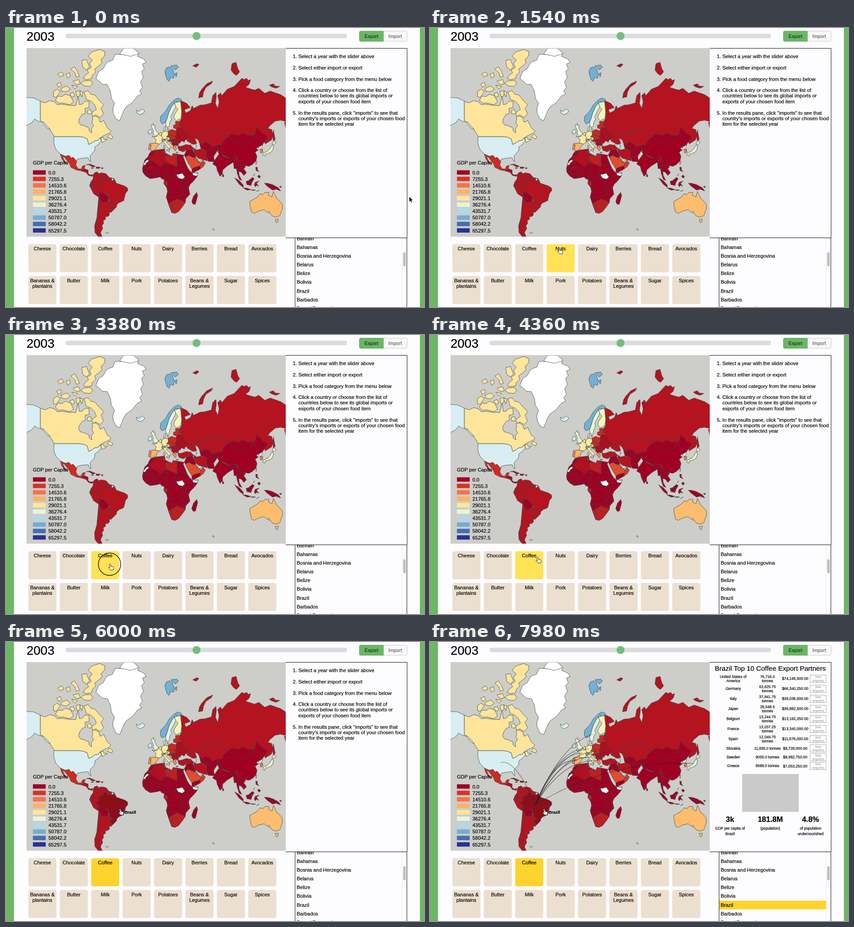
An HTML page for the animation above (8 s loop, 916 px wide and 611 px high).

```html
<!DOCTYPE html>
<html lang="en">
<head>
<meta charset="utf-8">
<title>Food trade map</title>
<style>
html, body { margin: 0; width: 100%; height: 100%; overflow: hidden; background: #fdfcfe; }
svg { display: block; width: 916px; height: 611px; font: 10.95px "Liberation Sans", Arial, sans-serif; }
text:not([fill]) { stroke: #000; stroke-width: .2; }
#map path { stroke: #37474a; stroke-width: .8; stroke-linejoin: round; }
#map .lines { fill: none; }
#arcs path { fill: none; stroke: #222; stroke-opacity: .58; stroke-width: 1.2; }
</style>
</head>
<body>
<svg viewBox="0 0 916 611">
<defs>
  <clipPath id="mapClip"><rect x="45" y="44" width="568" height="413"/></clipPath>
  <clipPath id="listClip"><rect x="633" y="460" width="247" height="151"/></clipPath>
</defs>
<rect width="916" height="611" fill="#fdfcfe"/>
<path d="M0 0H17.5V611H0ZM907 0H916V611H907Z" fill="#6cb664"/>
<rect x="130.500" y="12.500" width="616.500" height="10" rx="4" fill="#dcdcdc"/>
<circle cx="417.500" cy="17.500" r="8.800" fill="#76bd7c"/>
<rect x="774.500" y="7" width="104.500" height="22" rx="2.500" fill="#f8f8f8" stroke="#c9c9c9"/>
<path d="M777 7H827V29H777Q774.500 29 774.500 26V10Q774.500 7 777 7Z" fill="#69b764" stroke="#5aa556"/>

<g clip-path="url(#mapClip)" id="map">
<rect x="45" y="44" width="568" height="413" fill="#cdcdca"/>
<g fill="#fee59a">
  <path d="M75 160 85 164 96 159 107 162 112 168 123 167 136 169 153 170 158 150 161 168 168 166 173 160 182 161 182 174 173 176 174 187 167 189 161 198 159 206 163 212 171 214 182 219 182 225 188 230 187 220 192 214 188 207 190 202 189 193 197 193 204 198 206 206 211 205 214 202 222 219 230 225 227 230 213 236 206 241 213 239 215 244 222 244 211 251 209 247 208 242 206 241 202 246 195 247 188 252 181 255 178 243 169 239 159 238H106L96 222 83 207 75 204Z"/>
  <path d="M187 53 205 47 217 52 216 61 208 70 211 76 202 84 194 90 197 96 189 104 188 111 176 113 169 110 174 103 181 98 178 92 187 86 183 78 189 70 180 62Z"/>
  <path d="M166 71 176 69 180 78 183 85 176 92 168 86Z"/>
  <path d="M170 116 186 115 190 122 184 128 172 127 164 121Z"/>
  <path d="M171 140 180 137 186 145 195 147 204 158 214 168 208 176 214 188 206 196 196 190 192 194 187 186 198 178 194 168 186 160 176 156Z"/>
  <path d="M108 158 114 149 123 150 130 145 142 149 148 162 140 168 124 164 116 165Z"/>
  <path d="M104 150 104 139 112 134 119 139 110 152ZM140 144 147 141 151 149 144 152ZM153 139 163 137 161 149 156 151ZM121 132 133 127 141 134 132 140 121 138ZM111 123 119 119 122 126 115 130Z"/>
  <path d="M142 90 150 85 156 94 161 106 154 108 151 98ZM131 101 139 98 141 106 135 110ZM147 116 159 113 163 122 154 124ZM113 101 122 96 127 103 118 107ZM144 125 157 128 151 134ZM178 181 185 178 189 188 179 188ZM161 139 169 140 166 151Z"/>
  <path d="M222 239 227 232 234 238 232 243Z"/>
</g>
<path fill="#fff" d="M197 111 203 95 213 89 221 75 234 70 239 58 256 58 265 50 279 45 291 55 288 62 302 68 307 75 299 79 303 90 297 95 301 108 295 118 299 130 293 137 297 145 288 149 277 163 263 173 258 181 254 191 249 203 241 199 235 187 234 176 238 165 231 154 229 139 222 124 211 123 205 117Z"/>
<path fill="#fff" d="M249 57 258 44 279 44 292 56 273 62Z"/>
<g fill="#d8eef2">
  <path d="M44 152 60 153 75 160V203L83 207 97 222 91 220 79 206 70 204 63 199 57 207 44 214Z"/>
  <path d="M105 238H159L169 239 178 243 181 255 188 252 195 247 202 246 206 241 209 247 202 255 195 260 194 269 184 280 186 293 183 291 180 284 168 285 157 287 155 292 147 283 143 285 138 279 130 281 119 276 109 265 105 253Z"/>
  <path d="M286 180 291 183 299 177 304 182 301 187 293 190 287 186Z"/>
</g>
<path fill="#cf2a21" d="M119 276 130 281 138 279 143 285 147 283 155 292 153 300 158 308 164 309 168 302 174 301 171 309 165 313 154 311 142 305 139 297 127 282 124 282 128 290 133 297 129 296 122 286Z"/>
<g fill="#ad0f20">
  <path d="M165 313 171 308 180 311 180 319 185 322 191 321 189 325 181 323 175 316Z"/>
  <path d="M176 299 184 298 196 303 190 305 183 300ZM198 304 207 305 203 308 197 307ZM209 306 213 306 212 308 209 308ZM187 306 192 307 188 308Z"/>
</g>
<g fill="#b31420">
  <path d="M191 322 194 317 200 315 203 319 209 317 219 319 226 327 237 330 236 337 226 362 204 371 192 363 183 345 186 337 191 330Z"/>
  <path d="M203 371 211 364 214 380 227 378 233 387 227 394 234 400 230 404 226 403 227 409 223 413 218 413 218 419 213 422 214 428 210 433 212 439 207 448 211 458H203L195 448 194 433 199 416 201 394Z"/>
  <path class="lines" d="M200 315 199 323 211 327 209 335 205 336 204 345M186 337 204 345 198 352M184 342 192 342 196 339M213 361 203 362 204 370M211 366 207 381 204 405 201 425 199 440 204 455M214 380 208 383M227 394 225 402M227 378 222 382 233 387M226 327 226 334M231 329 232 334"/>
</g>
<path fill="#a00022" d="M204 360 213 361 222 367 226 373 223 380 210 382 205 371Z"/>
<path fill="#e5f4cf" d="M232 329 237 331 235 335 231 334Z"/>
<path id="brazil" d="M237 330 240 336 242 340 251 343 260 346 266 350 267 356 262 362 260 370 258 378 247 383 243 387 242 392 234 400 227 394 233 387 230 384 226 378 226 372 222 366 213 361 204 359 198 353 204 346 204 338 209 336 213 336 213 331 220 329 222 335 235 334Z"/>

<g fill="#b31420">
  <path d="M383 159 396 165 404 174 391 179 394 186 404 181 408 170 411 176 425 169 436 168 450 164 453 148 460 141 461 150 459 165 464 176 467 162 464 148 470 142 473 148 485 134 500 128 517 110 522 113 527 110 531 115 536 113 533 123 525 130 545 136 554 132 567 143 579 138 602 146 614 154V205L602 202 590 204 578 214 574 220 582 222 585 233 582 245 568 254 566 248 573 238 562 232 549 217 545 235 531 235 518 230 509 235 496 232 487 237 473 231 463 223 452 222 440 226 441 232 428 231 418 233 414 241 418 253 410 255 396 247 402 237 392 229 386 218 379 215 381 204 385 197 385 184Z"/>
  <path d="M422 153 424 142 429 134 440 122 453 116 450 122 438 130 433 140 431 151ZM495 78 504 75 508 89 512 96 505 104 499 100 493 92ZM409 83 418 78 423 80 417 86ZM577 125 586 122 590 127 600 128 592 132 582 129ZM586 223 588 234 590 244 586 248 584 236ZM610 207 614 205V222Z"/>
  <path d="M414 241 418 233 428 231 441 232 440 226 452 222 463 223 473 231 487 237 484 246 476 248 474 256 464 256 452 261 446 253 436 250 430 255 424 252 421 245Z"/>
  <path d="M376 259 384 259 395 255 405 257 411 263 408 267 396 268 388 271 379 268Z"/>
  <path d="M411 263 418 267 427 265 440 269 441 291 430 288 421 285 413 276Z"/>
</g>
<g fill="#a00022">
  <path d="M424 252 430 255 436 250 446 253 452 261 464 256 474 256 466 265 463 269 455 281 457 293 443 292 440 283 440 269 427 264Z"/>
  <path d="M463 264 474 255 476 248 487 237 496 232 509 235 518 230 531 235 545 235 549 217 562 231 573 238 566 249 562 256 554 260 548 264 553 267 546 272 550 281 548 291 540 299 532 303 519 300 512 300 506 284 490 285 474 278 467 271Z"/>
  <path d="M463 268 472 271 474 279 488 285 504 282 503 287 498 294 490 299 485 302 475 311 474 320 469 325 463 312 461 303 453 298 457 290 467 276Z"/>
  <path d="M498 293 505 284 512 300 519 299 525 303 521 308 527 317 521 323 516 316 510 314 511 323 517 334 511 331 507 319 505 308 500 308Z"/>
  <path d="M396 268 409 265 413 276 417 283 411 284 400 279 393 283 391 277Z"/>
  <path d="M407 309 414 305 425 302 427 308 411 317 408 316ZM475 319 478 325 474 326Z"/>
  <path d="M501 328 511 334 520 344 520 349 511 342ZM519 350 529 351 537 354 528 355ZM546 338 555 335 549 340 554 347 549 344 547 348 544 344ZM538 354 547 355 539 356ZM555 355 549 358Z"/>
  <path d="M526 336 532 334 540 327 544 330 539 338 537 345 528 343ZM547 305 551 305 551 311 555 315 548 312ZM554 322 558 325 555 329 551 325ZM566 340 573 340 584 343 597 350 602 357 592 353 584 355 573 347ZM599 347 604 347 602 350ZM545 319 542 324Z"/>
  <path class="lines" d="M487 237 496 246 503 252 518 256 531 250 537 243 547 240 545 235M440 269 452 268 463 265M440 283 455 281M452 261 447 266 436 258 430 255M498 293 503 287M512 300 506 303 509 318M512 300 519 308 515 315M519 300 526 307M526 337 535 336 540 330M584 343V355M396 268 401 279M409 265 406 273 416 283M474 279 476 282 488 285M497 293 491 288"/>
</g>
<path fill="#e14c2d" d="M393 283 400 279 411 284 417 285 421 292 428 295 425 302 414 305 407 308 400 297Z"/>
<path fill="#d9372a" d="M428 295 432 290 437 296 432 304 426 308 425 302Z"/>
<path fill="#d3ebef" d="M421 292 425 293 431 289 428 295ZM419 288 421 288 420 292Z"/>
<path fill="#fff" d="M553 262 562 256 561 262 557 266Z"/>
<path fill="#f67649" d="M557 266 562 265 563 272 558 274Z"/>
<path fill="#eaf4cb" d="M564 274 573 270 579 264 582 257 585 256 586 263 582 271 574 275 568 276 567 281 563 279ZM583 254 586 247 592 250 588 255ZM547 293 550 292 548 299Z"/>
<path fill="#fdbd6e" d="M534 380 541 376 550 371 557 363 563 365 567 360 576 360 575 366 583 370 586 358 589 364 593 373 599 378 605 385 606 394 600 411 593 414 584 412 580 407 576 405 577 401 573 404 566 398 553 401 544 406 538 403 535 390Z"/>
<path fill="#fdbd6e" d="M590 419 597 419 595 426 592 426Z"/>
<path fill="#fff" d="M452 440 456 440 456 443 453 442ZM218 448 223 447 225 449 221 450Z"/>

<path fill="#a00022" d="M318 270 330 267 347 265 349 274 357 278 364 281 366 275 375 276 391 279 388 282 397 304 402 312 410 319 421 317 419 325 412 334 403 343 400 350 403 364 394 374 393 382 386 392 378 402 370 406 363 404 356 385 351 370 354 358 352 349 346 341 347 332 341 330 338 326 330 328 316 330 306 324 300 316 299 308 301 300 304 289 312 281 313 277Z"/>
<path fill="#a00022" d="M410 386 407 380 411 368 418 360 420 367 415 386Z"/>
<path fill="#b01020" d="M322 270 347 265 345 273 348 279 349 289 351 294 338 303 314 287 312 283 323 277Z"/>
<g fill="#be1f22">
  <path d="M348 279 357 278 364 281 366 275 375 276 375 304 351 294 349 289Z"/>
  <path d="M344 267 347 265 349 272 348 278 345 273Z"/>
  <path d="M356 385 375 374 383 377 393 382 386 392 378 402 370 406 363 404Z"/>
  <path d="M346 336 353 336 354 343 350 346 346 341Z"/>
</g>
<path fill="#fff" d="M373 321 380 320 386 318 392 326 387 331 378 329ZM408 318 421 318 419 324 411 323ZM300 300 307 290 313 288 312 292 306 297 306 300Z"/>
<path class="lines" d="M375 276V302H396M351 294 355 305 352 316 358 325M375 302 373 304 370 315 374 323M338 303 337 309 330 310 323 315 318 323M317 289 313 307H300M313 307 321 311M299 314 309 315 307 322M312 316 318 324 316 330M322 316 322 328M330 314 331 328M335 315 336 327M341 313 352 314 350 321 345 329M358 325 347 333M352 349 358 346 364 327 378 329M358 325 363 321 373 321M378 329 386 332 383 347 387 353M386 332 400 333 403 330M383 341 400 349M402 312 397 308 392 318M397 325 409 326M354 358 366 360 374 356 385 356 388 361 376 371 370 371M387 353 402 357M388 361 394 366 393 373 383 377M352 371H374M366 373 364 388 363 397M365 392 375 386 383 377M388 361 390 369M393 343 393 338M338 303 351 300M316 302 330 310"/>

<path fill="#fdb268" d="M314 253 327 252 336 254 330 261 328 266 320 269 316 267 318 256Z"/>
<path fill="#f58e55" d="M314 255 318 256 316 267 312 266Z"/>
<g fill="#fee89f">
  <path d="M327 252 329 244 323 239 330 238 334 232 344 239 341 246 343 250 336 254Z"/>
  <path d="M341 232 346 226 355 227 356 233 352 238 354 242 345 244 341 237Z"/>
  <path d="M343 248 352 244 354 249 351 250 357 256 363 262 358 263 359 267 355 262 346 251ZM351 267 358 267 357 271ZM345 258 348 257 348 264 346 264Z"/>
  <path d="M345 244 354 242 358 239 362 241 358 245 350 245ZM334 232 340 228 341 237Z"/>
</g>
<g fill="#e6f4d5">
  <path d="M320 238 325 233 321 231 324 227 320 219 318 213 324 209 322 213 327 214 326 219 330 227 334 231 332 235Z"/>
  <path d="M350 206 353 198 357 184 363 172 369 164 372 172 366 184 361 193 363 200 359 206 358 214 354 219 350 212ZM346 226 346 218 350 215 349 224ZM353 221 356 220 355 224Z"/>
</g>
<path fill="#d0e9ef" d="M312 232 312 225 317 221 320 226 319 231Z"/>
<path fill="#f7f4b7" d="M369 164 375 163 380 159 383 165 385 185 383 198 373 203 368 197 369 190 377 178 372 172Z"/>
<g fill="#74b0d5">
  <path d="M342 210 338 204 339 193 350 182 358 168 368 158 377 153 385 157 380 162 371 161 363 172 357 184 353 198 350 206Z"/>
  <path d="M348 95 352 87 359 85 365 90 369 102 367 110 361 108 357 117 353 113 350 104ZM361 83 374 81 378 86 371 92ZM370 100 375 98 373 107Z"/>
  <path d="M341 246 346 244 350 246 343 249Z"/>
</g>
<g fill="#c9291f">
  <path d="M355 226 363 222 372 225 374 234 371 238 356 234Z"/>
  <path d="M371 205 380 204 380 216 375 222 367 219 367 213 372 211Z"/>
  <path d="M352 238 357 234 371 238 369 243 359 245 358 239Z"/>
  <path d="M354 246 362 244 364 249 357 248 364 256Z"/>
</g>
<g fill="#ad0f20">
  <path d="M372 225 377 217 386 218 392 229 402 237 400 242 392 246 391 250 385 247 381 252 370 252 371 238 374 231Z"/>
  <path d="M361 245 370 243 370 252 378 252 378 257 367 259 364 255Z"/>
  <path class="lines" d="M374 231 386 231 392 229M370 243 377 241 384 247M404 256 410 252 418 257 416 264M378 252 382 252"/>
</g>
<path fill="#f58755" d="M365 260 370 257 377 257 371 260 374 264 371 269 367 265ZM372 272 378 272 374 274Z"/>
<path fill="#fee89f" d="M391 269 395 267 393 271Z"/>
</g>

<g id="arcs"></g>
<g id="legend"></g>
<path d="M613 44.500H879V459.500H613M633.500 460V611M878.500 460V611" fill="none" stroke="#111"/>
<g id="list" clip-path="url(#listClip)"><rect id="picked" x="634" y="566.500" width="234" height="19" fill="#ffd32e"/></g>
<path d="M868.500 460V611" stroke="#ececec"/>
<rect x="870.500" y="491" width="5.500" height="31" rx="2.700" fill="#bdbdbd"/>
<g id="foods"></g>
<g id="labels"></g>
<g id="help"></g>
<g id="results"><rect x="684" y="289" width="124" height="83" fill="#cacaca"/></g>
<g id="pointer">
  <circle id="ring" r="24.500" fill="none" stroke="#111" stroke-width="1.400"/>
  <text id="tip" x="11" y="9.500" font-size="9.100" font-weight="bold">Brazil</text>
  <path id="arrow" d="M0 0V12L2.700 9.500 4.700 13.700 6.700 12.800 4.800 8.700H8.500Z" stroke="#fff" stroke-width=".8"/>
  <path id="hand" d="M-.4 1C-.2 -.8 1.800 -.8 2.200 .8L3.100 4.800 6.800 5.400C8.800 5.800 9.200 7 8.800 8.500L7.800 12.800H2.300L-2 8.300C-3 7 -1.700 6.200 -.5 7L1 8Z" fill="#fff" stroke="#111" stroke-width=".9"/>
</g>
</svg>
<script>
const $ = id => document.getElementById(id);

function add(parent, tag, attrs) {
  const node = document.createElementNS('http://www.w3.org/2000/svg', tag);
  for (const key in attrs) node.setAttribute(key, attrs[key]);
  return $(parent).appendChild(node);
}
function text(parent, x, y, words, attrs = {}) {
  add(parent, 'text', { x, y, ...attrs }).textContent = words;
}
// Centred lines, placed around a vertical middle.
function block(parent, x, middle, words, size, lead, attrs) {
  const lines = words.split('|');
  lines.forEach((line, i) => text(parent, x, middle + size * .35 + (i - (lines.length - 1) / 2) * lead, line,
    { 'font-size': size, 'text-anchor': 'middle', ...attrs }));
}

text('labels', 45, 28, '2003', { 'font-size': 27.5 });
block('labels', 801, 18, 'Export', 10.5, 0, { fill: '#111' });
block('labels', 853, 18, 'Import', 10.5, 0, { fill: '#444' });

text('legend', 59, 299, 'GDP per Capita');
['#a00022', '#d73328', '#f77249', '#fdb264', '#fee799', '#e8f5da', '#b1d8ea', '#74add1', '#456fb0', '#2c318f']
  .forEach((fill, i) => {
    const y = 311.6 + i * 14.1;
    add('legend', 'rect', { x: 59, y, width: 28, height: 9.6, fill });
    text('legend', 93, y + 9, (i * 7255.281).toFixed(1));
  });

const foods = ['Cheese', 'Chocolate', 'Coffee', 'Nuts', 'Dairy', 'Berries', 'Bread', 'Avocados',
  'Bananas &|plantains', 'Butter', 'Milk', 'Pork', 'Potatoes', 'Beans &|Legumes', 'Sugar', 'Spices'];
const tiles = foods.map((name, i) => {
  const x = 49 + i % 8 * 68.85, y = i < 8 ? 473.5 : 543;
  const tile = add('foods', 'rect', { x, y, width: 61.5, height: 61.5, rx: 4 });
  name.split('|').forEach((line, k) =>
    text('foods', x + 30.7, y + 13.5 + k * 12.5, line, { 'text-anchor': 'middle' }));
  return { name, x, y, tile };
});

['Bahrain', 'Bahamas', 'Bosnia and Herzegovina', 'Belarus', 'Belize', 'Bolivia', 'Brazil', 'Barbados',
  'Brunei Darussalam'].forEach((name, i) => text('list', 637, 464.6 + i * 19.15, name));

[[66, '1.', 'Select a year with the slider above'],
 [90.5, '2.', 'Select either import or export'],
 [115.5, '3.', 'Pick a food category from the menu below'],
 [140, '4.', 'Click a country or choose from the list of|countries below to see its global imports or|exports of your chosen food item'],
 [189.5, '5.', 'In the results pane, click “imports” to see that|country’s imports or exports of your chosen food|item for the selected year']]
  .forEach(([y, number, words]) => {
    text('help', 628.5, y, number);
    words.split('|').forEach((line, i) => text('help', 640.7, y + i * 12.4, line));
  });

block('results', 745.7, 57.5, 'Brazil Top 10 Coffee Export Partners', 15, 0);
// Partner, tonnes, value, and the map point its arc reaches.
const partners = [
  ['United States of|America', '76,716.0', '74,146,500', 155, 264],
  ['Germany', '63,625.75', '66,340,250', 348, 234],
  ['Italy', '37,841.75', '39,036,500', 352, 253],
  ['Japan', '28,548.5', '36,882,500', 578, 266],
  ['Belgium', '13,244.75', '13,162,250', 338, 233],
  ['France', '13,037.25', '13,340,000', 334, 243],
  ['Spain', '12,049.75', '11,576,000', 323, 260],
  ['Slovakia', '11,835.0', '9,728,000', 365, 239],
  ['Sweden', '9055.0', '8,982,750', 356, 202],
  ['Greece', '8588.0', '7,053,250', 370, 260]];
const arcs = partners.map(([name, tonnes, value, x, y], i) => {
  const row = i < 7 ? 80.5 + i * 22 : 233 + (i - 7) * 19.3;
  block('results', 664.5, row, name, 8.2, 9.5);
  block('results', 739.5, row, tonnes + (i < 7 ? '|' : ' ') + 'tonnes', 8.2, 9.5);
  block('results', 800.3, row, `$${value}.00`, 8.3, 0);
  add('results', 'rect', { x: 833, y: row - 8, width: 35, height: 16, fill: '#fff', stroke: '#aaa' });
  block('results', 850.5, row - .2, 'See|Imports', 7.5, 7.6, { fill: '#888' });
  const midX = (231 + x) / 2 - 6, midY = (356 + y) / 2 - 55;
  return add('arcs', 'path', { d: `M231 356Q${midX} ${midY} ${x} ${y}`, pathLength: 1, 'stroke-dasharray': '1 2' });
});
[[657.5, '3k', 'GDP per capita of|Brazil'], [745.7, '181.8M', '(population)'], [834, '4.8%', 'of population|undernourished']]
  .forEach(([x, figure, caption]) => {
    block('results', x, 388.2, figure, 16.5, 0, { 'font-weight': 'bold' });
    caption.split('|').forEach((line, i) => block('results', x, 408.3 + i * 12.3, line, 8.2, 0));
  });

// Pointer stops: time, x, y.
const stops = [[0, 883.5, 369], [20, 883.5, 369], [840, 584, 414.5], [1540, 282, 482], [1680, 282, 482],
  [2350, 227, 502], [4180, 227, 502], [4900, 275.5, 404], [5040, 275.5, 404], [5720, 249, 366], [8000, 249, 366]];
const ease = k => k * k * (3 - 2 * k);
const show = (id, on) => $(id).setAttribute('visibility', on ? 'visible' : 'hidden');
const within = (t, from, to) => t >= from && t < to;

function pointerAt(t) {
  const i = stops.findIndex(stop => stop[0] > t);
  const [t0, x0, y0] = stops[i - 1], [t1, x1, y1] = stops[i];
  const k = ease((t - t0) / (t1 - t0));
  return [x0 + (x1 - x0) * k, y0 + (y1 - y0) * k];
}

function render(t) {
  const [x, y] = pointerAt(t);
  let onTile = false;
  for (const item of tiles) {
    const over = within(x, item.x, item.x + 61.5) && within(y, item.y, item.y + 61.5);
    onTile ||= over;
    const chosen = item.name === 'Coffee' && t > 3560;
    item.tile.setAttribute('fill', over ? '#ffe255' : chosen ? '#ffd32e' : '#ebdfcf');
  }
  const onBrazil = t > 5040 && y < 381;
  const loaded = t >= 7560;
  $('pointer').setAttribute('transform', `translate(${x.toFixed(2)} ${y.toFixed(2)})`);
  $('brazil').setAttribute('fill', onBrazil ? '#8b0f19' : '#b31420');
  show('tip', onBrazil);
  show('hand', onTile || onBrazil);
  show('arrow', !onTile && !onBrazil);
  show('ring', within(t, 3040, 3560) || within(t, 7040, 7400));
  show('help', !loaded);
  show('results', loaded);
  show('picked', loaded);
  show('arcs', loaded);
  const drawn = Math.min(1, Math.max(0, (t - 7560) / 400));
  arcs.forEach(arc => arc.setAttribute('stroke-dashoffset', 1 - drawn));
}

const start = performance.now();
function tick() {
  render((performance.now() - start) % 8000);
  requestAnimationFrame(tick);
}
tick();
</script>
</body>
</html>
```
